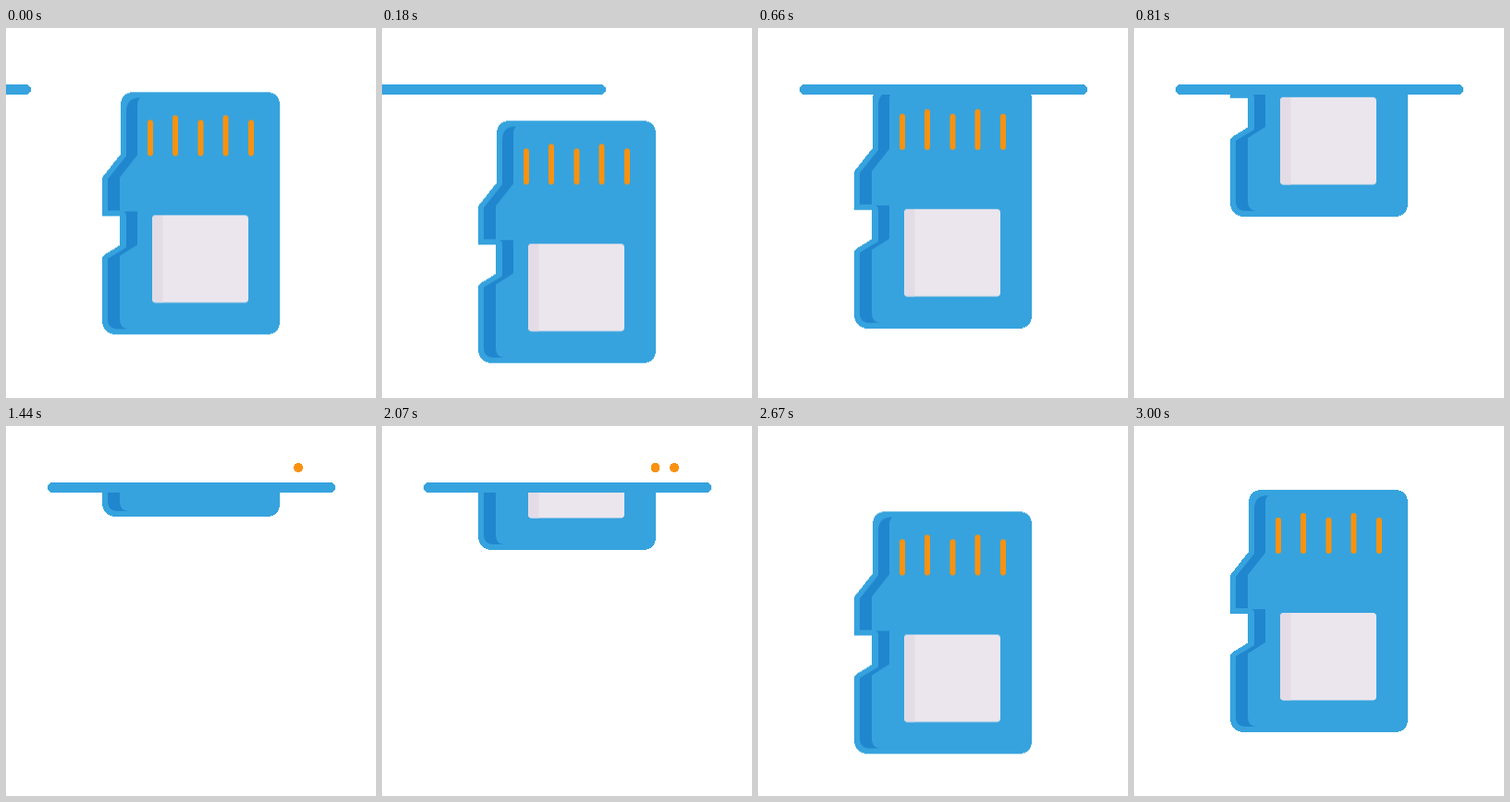
An HTML page for the animation above (5.09 s loop, 400 by 400 pixels).

```html
<!DOCTYPE html>
<html lang="en">
<head>
<meta charset="utf-8">
<title>Memory card</title>
<style>
  html, body { margin: 0; width: 100%; height: 100%; overflow: hidden; background: #fff; }
  svg { display: block; width: 100%; height: 100%; }
  .blue { fill: #36a3de; shape-rendering: crispEdges; }
  .shade { fill: #2086ce; }
  .pins { fill: none; stroke: #f9920f; stroke-width: 6; stroke-linecap: round; }
  .dot { fill: #f9920f; shape-rendering: crispEdges; }
</style>
</head>
<body>
<svg viewBox="0 0 400 400">
  <clipPath id="below"><rect y="66" width="400" height="334"/></clipPath>
  <g clip-path="url(#below)">
    <g id="card">
      <path class="blue" d="M139 69H281Q296 69 296 84V316Q296 331 281 331H120Q104 331 104 315V249Q104 246 106 245L123 234.500V203H106Q104 203 104 201V163Q104 161 105 160L124 136V84Q124 69 139 69Z"/>
      <path class="shade" d="M145 75Q130 75 130 90V138L110 163V197H123V161L142 137V83Q142 78 145 75Z"/>
      <path class="shade" d="M127 198H142V234L123 246V314Q123 325 133 325H121Q110 325 110 314V249L130 237V202Q130 199 127 198Z"/>
      <rect x="158" y="202" width="104" height="94.5" rx="4" fill="#ebe6ed"/>
      <path d="M169.500 202V296.500H162Q158 296.500 158 292.500V206Q158 202 162 202Z" fill="#e3dce6"/>
      <path class="pins" d="M156 102V135M183 97V135M210.500 102V135M237.500 97V135M265 102V135"/>
    </g>
  </g>
  <rect id="slot" class="blue" x="45" y="61" width="311" height="11" rx="5.5"/>
  <circle id="leftDot" class="dot" cx="295.5" cy="45" r="5"/>
  <circle id="rightDot" class="dot" cx="316" cy="45" r="5"/>
</svg>
<script>
  const LOOP = 5090;
  const CUBIC_IN = 'cubic-bezier(.3333,0,.6667,0)';
  const CUBIC_OUT = 'cubic-bezier(.3333,1,.6667,1)';
  const SINE = 'cubic-bezier(.37,0,.63,1)';

  const play = (id, frames) => document.getElementById(id).animate(
    frames, { duration: LOOP, iterations: Infinity });

  // Steps are [ms, position, easing to the next step].
  const move = (id, axis, steps) => play(id, steps.map(([ms, pos, easing = 'linear']) => ({
    offset: ms / LOOP, transform: `translate${axis}(${pos}px)`, easing
  })));

  // Steps are [ms, visible], switched without fading.
  const blink = (id, steps) => play(id, [...steps, [LOOP, 0]].map(([ms, on]) => ({
    offset: ms / LOOP, opacity: on, easing: 'steps(1, end)'
  })));

  move('card', 'Y', [
    [0, 0, SINE],
    [333, 55, CUBIC_IN],
    [770, -90, CUBIC_OUT],
    [1207, -235.5, SINE],
    [1350, -233],
    [1740, -233, 'cubic-bezier(.73,0,.49,1)'],
    [2620, 24.5, SINE],
    [3000, 0],
    [LOOP, 0]
  ]);

  move('slot', 'X', [
    [0, -360, CUBIC_OUT],
    [570, 0],
    [2015, 0, 'cubic-bezier(.7,0,.84,0)'],
    [2655, 365],
    [LOOP, 365]
  ]);

  blink('leftDot', [[0, 0], [1020, 1], [1440, 0], [1530, 1], [1740, 0], [1830, 1], [2400, 0]]);
  blink('rightDot', [[0, 0], [900, 1], [2490, 0]]);
</script>
</body>
</html>
```
